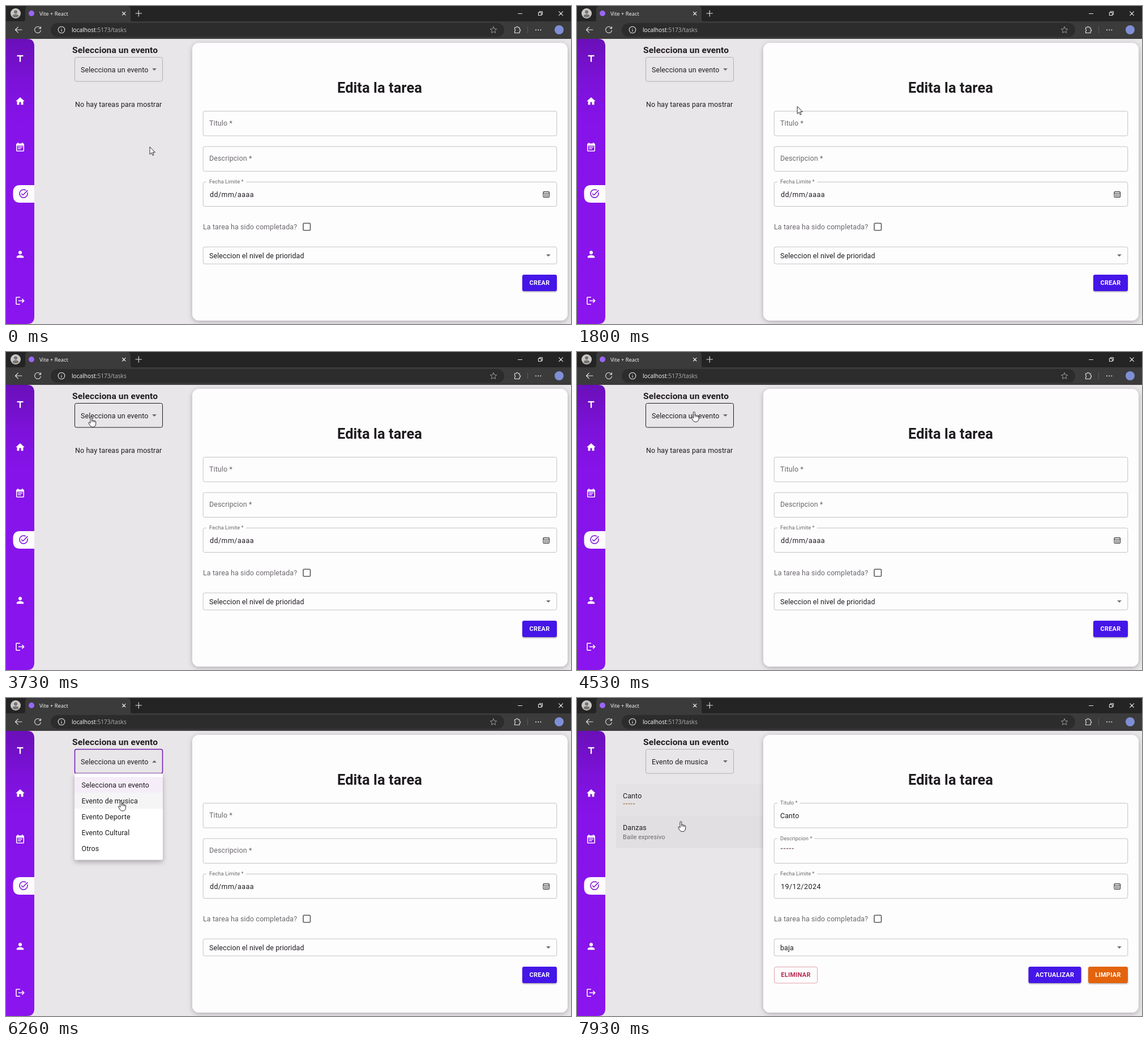
An HTML page that plays this animation: 998x561 px, repeating every 8 s.

```html
<!DOCTYPE html>
<html lang="es">
<head>
<meta charset="utf-8">
<title>Tareas</title>
<style>
  html, body { margin: 0; width: 100%; height: 100%; overflow: hidden; background: #e9e6e9; }
  svg { display: block; width: 100%; height: 100%; }
  text { font-family: Roboto, sans-serif; font-size: 12.45px; letter-spacing: .00938em; fill: #1f1c20; white-space: pre; }
  .ui { font-family: "Open Sans", sans-serif; letter-spacing: 0; fill: #fff; }
  .soft { fill: #6a676b; }
  .small { font-size: 10.9px; letter-spacing: .0107em; }
  .btn { font-size: 10.9px; font-weight: 600; letter-spacing: .02857em; text-anchor: middle; fill: #fff; }
  .date { letter-spacing: .47px; }
  .box { fill: none; stroke: #c3c1c4; }
  .line { fill: none; stroke: #e6e6e6; stroke-width: 1.1; stroke-linecap: round; stroke-linejoin: round; }
</style>
</head>
<body>
<svg id="stage" viewBox="0 0 998 561" xmlns="http://www.w3.org/2000/svg"></svg>
<script>
const LOOP = 8000;
const OPEN = 5313, PICK = 6450, LIST = 6520, EDIT = 7450, CROSS = 7868;
const MENU_MS = 280;
const CARD = '#fefdfe';

// ---- markup helpers ----
const text = (x, y, s, cls = '', extra = '') => `<text x="${x}" y="${y}" class="${cls}" ${extra}>${s}</text>`;
const rect = (x, y, w, h, r, extra) => `<rect x="${x}" y="${y}" width="${w}" height="${h}" rx="${r}" ${extra}/>`;
const line = (d, extra = '') => `<path class="line" d="${d}" ${extra}/>`;
const group = (id, body, extra = '') => `<g id="${id}" ${extra}>${body}</g>`;
const icon = (cx, cy, d, fill = '#fff', k = .78) =>
  `<path transform="translate(${cx} ${cy}) scale(${k}) translate(-12 -12)" fill="${fill}" d="${d}"/>`;
const field = (y, h) => rect(348.2, y, 624.6, h, 3, 'class="box"');
const notch = (id, y, w) => rect(354, y - 1, w, 2.4, 0, `id="${id}" fill="${CARD}"`);
const button = (x, w, color, label) =>
  rect(x, 474, w, 29, 3, `fill="${color}" filter="url(#lift)"`) + text(x + w / 2, 491.8, label, 'btn');

const ICONS = {
  title: 'M5 4v3h5.5v12h3V7H19V4z',
  home: 'M10 20v-6h4v6h5v-8h3L12 3 2 12h3v8z',
  event: 'M17 10H7v2h10v-2zm2-7h-1V1h-2v2H8V1H6v2H5c-1.11 0-1.99.9-1.99 2L3 19c0 1.1.89 2 2 2h14c1.1 0 2-.9 2-2V5c0-1.1-.9-2-2-2zm0 16H5V8h14v11zm-5-5H7v2h7v-2z',
  task: 'M22 5.18 10.59 16.6l-4.24-4.24 1.41-1.41 2.83 2.83 10-10L22 5.18zm-2.21 5.04c.13.57.21 1.17.21 1.78 0 4.42-3.58 8-8 8s-8-3.58-8-8 3.58-8 8-8c1.58 0 3.04.46 4.28 1.25l1.44-1.44C16.1 2.67 14.13 2 12 2 6.48 2 2 6.48 2 12s4.48 10 10 10 10-4.48 10-10c0-1.19-.22-2.33-.6-3.39l-1.61 1.61z',
  person: 'M12 12c2.21 0 4-1.79 4-4s-1.79-4-4-4-4 1.79-4 4 1.79 4 4 4m0 2c-2.67 0-8 1.34-8 4v2h16v-2c0-2.66-5.33-4-8-4',
  logout: 'm17 7-1.41 1.41L18.17 11H8v2h10.17l-2.58 2.58L17 17l5-5zM4 5h8V3H4c-1.1 0-2 .9-2 2v14c0 1.1.9 2 2 2h8v-2H4z',
  drop: 'm7 10 5 5 5-5z'
};

const defs = `<defs>
  <linearGradient id="side" x1="0" y1="0" x2="0" y2="1">
    <stop offset="0" stop-color="#6a0fb9"/><stop offset=".16" stop-color="#7d12da"/>
    <stop offset=".3" stop-color="#8613ea"/><stop offset="1" stop-color="#8a15ee"/>
  </linearGradient>
  <filter id="cardShadow" x="-5%" y="-5%" width="110%" height="110%">
    <feDropShadow dx="0" dy="2" stdDeviation="4" flood-opacity=".26"/>
  </filter>
  <filter id="lift" x="-20%" y="-30%" width="140%" height="180%">
    <feDropShadow dx="0" dy="1.4" stdDeviation="1.3" flood-opacity=".35"/>
  </filter>
  <filter id="menuShadow" x="-20%" y="-20%" width="140%" height="150%">
    <feDropShadow dx="0" dy="4" stdDeviation="4" flood-opacity=".28"/>
  </filter>
</defs>`;

function browserBar() {
  return rect(0, 0, 998, 28, 0, 'fill="#242424"') +
    rect(0, 27, 998, 31, 0, 'fill="#3b3b3b"') +
    '<path fill="#3b3b3b" d="M29 27.5q5 0 5-5V6q0-6 6-6H214q6 0 6 6V22.500q0 5 5 5z"/>' +
    '<circle cx="17" cy="13" r="9" fill="#c9c7c6"/><circle cx="17" cy="10.400" r="3" fill="#77736f"/>' +
    '<path fill="#77736f" d="M11.500 18.500q0-4 5.500-4t5.500 4q-5.500 3.600-11 0z"/>' +
    '<circle cx="45" cy="13" r="5" fill="#9a66f5"/>' +
    text(59, 16.6, 'Vite + React', 'ui', 'style="font-size:9.4px"') +
    line('M205.500 10.500l5.500 5.500m0-5.500l-5.500 5.500M229 13h10.500M234.300 7.800v10.500') +
    line('M904.500 13.500h7M976.700 9.800l6.800 6.800m0-6.800l-6.800 6.800') +
    line('M940.500 11.500h5v5h-5zM942.200 11v-1.200h5.300v5.200h-1.500', 'stroke-width="1"') +
    line('M28 42H16.500m4.800-4.800L16.500 42l4.800 4.800') +
    line('M61 39.500A5.500 5.500 0 1 0 61.500 43M61.500 36.500v3.300h-3.300') +
    rect(79, 30, 801, 24.500, 12.25, 'fill="#2c2c2c"') +
    '<circle class="line" cx="98" cy="42" r="5.800"/>' + line('M98 41.500v3.200M98 39.200v.1') +
    `<text x="116" y="45.800" class="ui" style="font-size:10.2px">localhost<tspan fill="#b4b4b4">:5173/tasks</tspan></text>` +
    line('M861 36.600l1.700 3.600 3.900.5-2.900 2.700.8 3.900-3.500-1.900-3.500 1.900.8-3.900-2.900-2.700 3.900-.5z', 'style="stroke:#a8a8a8;stroke-width:.9"') +
    line('M898.500 38h2.600a1.700 1.700 0 0 1 3.400 0h2.500v3a1.700 1.700 0 0 1 0 3.400v3.100h-8.500v-3.200a1.600 1.600 0 0 0 0-3.100z') +
    line('M921.500 36.500v11', 'style="stroke:#5a5a5a"') +
    [936, 940.2, 944.4].map(x => `<circle cx="${x}" cy="42.300" r="1" fill="#e6e6e6"/>`).join('') +
    '<circle cx="977" cy="42" r="8" fill="#7f8fd6"/>';
}

function sidebar() {
  return '<path fill="url(#side)" d="M0 58H37q13 0 13 13V548q0 13-13 13H0z"/>' +
    '<path fill="#fdfbfd" d="M50 316H25q-12.500 0-12.500 12.500v6q0 12.500 12.500 12.500H50z"/>' +
    icon(25, 93, ICONS.title) + icon(25, 168, ICONS.home) + icon(25, 249.500, ICONS.event) +
    icon(31, 331, ICONS.task, '#7a14d6') + icon(25, 438, ICONS.person) + icon(25, 520, ICONS.logout);
}

function taskPanel() {
  return text(117, 82.7, 'Selecciona un evento', '', 'style="font-size:15.56px;font-weight:600;letter-spacing:.0075em"') +
    rect(121.500, 90.500, 155, 42.500, 3, 'id="select" fill="none"') +
    text(132, 116.7, '', '', 'id="choice"') +
    group('selectArrow', icon(0, -.4, ICONS.drop, '#6a676b')) +
    text(122, 178.3, 'No hay tareas para mostrar', '', 'id="empty"') +
    group('list',
      rect(69, 152, 262, 56.500, 0, 'id="row0"') + rect(69, 208.500, 262, 56.500, 0, 'id="row1"') +
      text(81, 176.7, 'Canto') + text(81, 189.6, '-----', 'small', 'style="fill:#94713c;font-weight:700"') +
      text(81, 233, 'Danzas') + text(81, 249.2, 'Baile expresivo', 'small soft'));
}

function editCard() {
  return rect(329, 65, 663, 490, 12, `fill="${CARD}" filter="url(#cardShadow)"`) +
    text(660, 153.2, 'Edita la tarea', '', 'text-anchor="middle" style="font-size:25.4px;font-weight:600;letter-spacing:.003em"') +
    field(185.500, 43.500) + notch('notch0', 185.500, 39.500) +
    field(248, 43.500) + notch('notch1', 248, 65) +
    text(0, 0, 'Titulo *', 'soft', 'id="label0"') + text(0, 0, 'Descripcion *', 'soft', 'id="label1"') +
    field(310.500, 43) + notch('notch2', 310.500, 70) +
    text(359, 313.4, 'Fecha Limite *', 'soft', 'style="font-size:9.34px"') +
    text(360, 336.7, '', 'date', 'id="date"') +
    '<path fill="none" stroke="#222" stroke-width="1.100" d="M950.500 327.500h7.500q1.500 0 1.500 1.500v7q0 1.500-1.500 1.500h-7.500q-1.500 0-1.500-1.500v-7q0-1.500 1.500-1.500zM949 330.300h10.500"/>' +
    '<path stroke="#222" stroke-width="1.400" stroke-dasharray="1.500 1.100" d="M951 332.700h7M951 335.200h7"/>' +
    text(348, 394, 'La tarea ha sido completada?', 'soft') +
    rect(525, 383.200, 12.500, 12.500, 1.500, 'fill="none" stroke="#5c595d" stroke-width="1.600"') +
    field(425, 30) + text(359, 444.7, '', '', 'id="priority"') +
    icon(958, 439.700, ICONS.drop, '#6a676b') +
    group('create', button(912, 61, '#4418e8', 'CREAR')) +
    group('filled',
      text(359, 211.8, 'Canto') + text(359, 270.4, '-----', '', 'style="fill:#7d6670;font-weight:700"') +
      rect(348.500, 474.500, 76, 28.500, 3, 'fill="none" stroke="#e0a0a8"') +
      text(386.5, 491.8, 'ELIMINAR', 'btn', 'style="fill:#b5294f"') +
      button(797.500, 93, '#4418e8', 'ACTUALIZAR') + button(903, 70, '#e4640e', 'LIMPIAR'));
}

function menu() {
  const items = ['Selecciona un evento', 'Evento de musica', 'Evento Deporte', 'Evento Cultural', 'Otros'];
  return group('menu',
    rect(-78, 0, 156, 152.5, 3, 'fill="#fff" filter="url(#menuShadow)"') +
    rect(-78, 6.2, 156, 28, 0, 'fill="#7b1fa2" opacity=".08"') +
    rect(-78, 34.2, 156, 28, 0, 'id="itemHover" fill="#000" opacity=".04"') +
    items.map((s, i) => text(-65.5, 24.5 + 28 * i, s)).join(''));
}

function pointers() {
  const ink = 'fill="#fff" stroke="#111" stroke-width=".9" stroke-linejoin="round"';
  return group('arrow', `<path ${ink} d="M0 0V13.200L3.100 10.300 5.100 15 7.100 14.100 5.100 9.600H9.300z"/>`) +
    group('hand', `<path ${ink} d="M-1.500 1.200C-1.500-.4 1.300-.4 1.300 1.200V6.200C1.600 5.200 3.700 5.300 3.800 6.800 4.300 5.900 6 6.100 6.100 7.500 6.700 6.800 8.200 7.100 8.200 8.600V12C8.200 15.500 6.500 17.800 3 17.800 0 17.800-1.500 16.500-2.600 14.500L-4.600 11C-5.200 9.800-3.800 8.900-2.800 9.900L-1.500 11.200zM1.300 6.200V9M3.800 6.800V9.300M6.100 7.500V9.600"/>`);
}

const stage = document.getElementById('stage');
stage.innerHTML = defs + rect(0, 0, 998, 561, 0, 'fill="#e9e6e9"') +
  taskPanel() + editCard() + sidebar() + browserBar() + menu() + pointers();

const el = {};
stage.querySelectorAll('[id]').forEach(n => { el[n.id] = n; });

// ---- motion ----
const clamp = v => Math.max(0, Math.min(1, v));
const mix = (a, b, k) => a + (b - a) * k;
const smooth = k => k * k * (3 - 2 * k);

// CSS-style cubic-bezier easing, solved by bisection
function bezier(x1, y1, x2, y2) {
  const at = (a, b, u) => 3 * a * u * (1 - u) ** 2 + 3 * b * u * u * (1 - u) + u ** 3;
  return x => {
    x = clamp(x);
    let lo = 0, hi = 1;
    for (let i = 0; i < 20; i++) {
      const u = (lo + hi) / 2;
      if (at(x1, x2, u) < x) lo = u; else hi = u;
    }
    return at(y1, y2, (lo + hi) / 2);
  };
}
const easeInOut = bezier(.4, 0, .2, 1);
const easeOut = bezier(0, 0, .2, 1);

// pointer stops: time, x, y
const PATH = [
  [0, 254, 248.5], [1000, 228, 237.5], [2530, 529, 124.5], [3730, 150.5, 114.5], [5000, 232, 101.5],
  [5500, 232, 101.5], [6300, 203, 182], [7060, 202.7, 183.8], [7760, 203, 186], [7930, 183.5, 217.8], [LOOP, 183.5, 218]
];

function pointerAt(t) {
  const i = Math.max(1, PATH.findIndex(p => t < p[0]));
  const [a, b] = [PATH[i - 1], PATH[i]];
  const k = smooth(clamp((t - a[0]) / (b[0] - a[0])));
  return [mix(a[1], b[1], k), mix(a[2], b[2], k)];
}

const show = (node, on) => node.setAttribute('visibility', on ? 'visible' : 'hidden');
const inside = ([x, y], x0, y0, x1, y1) => x >= x0 && x <= x1 && y >= y0 && y <= y1;
const set = (node, attrs) => { for (const k in attrs) node.setAttribute(k, attrs[k]); };

function drawMenu(t, p) {
  const closing = t >= PICK;
  const k = (t - (closing ? PICK : OPEN)) / MENU_MS;
  const grown = closing ? 1 - easeInOut((k - .333) / .666) : easeInOut(k / .666);
  const s = .75 + .25 * grown;
  const fade = clamp(k);
  show(el.menu, t >= OPEN && !(closing && k >= 1));
  set(el.menu, {
    transform: `translate(199 133) scale(${s} ${s * s})`,
    opacity: closing ? 1 - easeInOut(k) : fade * fade
  });
  set(el.itemHover, { opacity: inside(p, 121, 167, 277, 195) ? .04 : 0 });
}

function drawLabel(i, y, t) {
  const k = easeOut((t - EDIT) / 200);
  el['label' + i].setAttribute('transform', `translate(359 ${mix(y, y - 22.8, k)}) scale(${mix(1, .75, k)})`);
  show(el['notch' + i], t >= EDIT);
}

function render(t) {
  const p = pointerAt(t);
  const open = t >= OPEN && t < PICK;
  const picked = t >= PICK, listed = t >= LIST, editing = t >= EDIT;
  const focused = t >= OPEN && !editing;
  const overSelect = inside(p, 121, 90, 277, 133);

  set(el.select, {
    stroke: focused ? '#7420b4' : overSelect ? '#1f1c20' : '#b2afb3',
    'stroke-width': focused ? 1.6 : 1
  });
  el.choice.textContent = picked ? 'Evento de musica' : 'Selecciona un evento';
  el.selectArrow.setAttribute('transform', `translate(262 112) rotate(${open ? 180 : 0})`);
  show(el.empty, !listed);
  show(el.list, listed);

  const leave = easeInOut((t - CROSS) / 150);
  const enter = easeInOut((t - LIST) / 150);
  set(el.row0, { 'fill-opacity': .05 * enter * (1 - leave) });
  set(el.row1, { 'fill-opacity': .05 * leave });

  drawMenu(t, p);
  drawLabel(0, 211.2, t);
  drawLabel(1, 273.4, t);
  el.date.textContent = editing ? '19/12/2024' : 'dd/mm/aaaa';
  el.priority.textContent = editing ? 'baja' : 'Seleccion el nivel de prioridad';
  show(el.create, !editing);
  show(el.filled, editing);

  const hand = open ? inside(p, 121, 139, 277, 279) : overSelect || listed || picked;
  show(el.hand, hand);
  show(el.arrow, !hand);
  set(hand ? el.hand : el.arrow, { transform: `translate(${p[0]} ${p[1]})` });
}

const start = performance.now();
function tick() {
  render((performance.now() - start) % LOOP);
  requestAnimationFrame(tick);
}
render(0);
requestAnimationFrame(tick);
</script>
</body>
</html>
```
